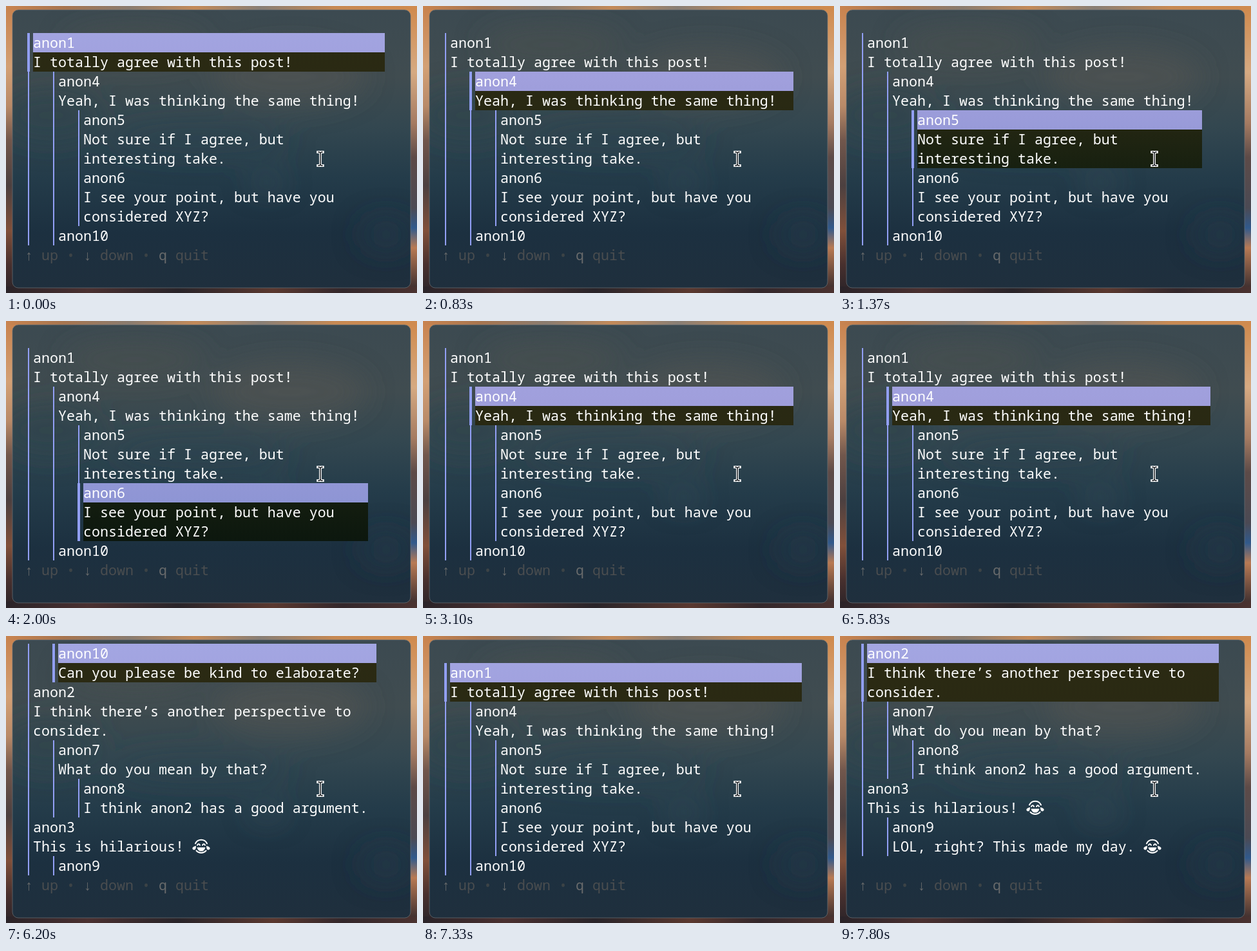
Animation, 638 px wide and 446 px high, one loop 8000 ms. Source, as an HTML page:

```html
<!DOCTYPE html>
<html lang="en">
<head>
<meta charset="utf-8">
<title>Comment thread</title>
<style>
  html, body { margin: 0; width: 100%; height: 100%; overflow: hidden; background: #2a2328; }
  svg { display: block; width: 100%; height: 100%; }
  text { font: 21.67px "Noto Sans Mono", "DejaVu Sans Mono", monospace; fill: #fff; white-space: pre; }
  .key { fill: #686a6b; }
  .hint { fill: #4a4d4f; }
  .dot { fill: #3c4346; }
  .bar { fill: #929ff5; }
  .face { fill: none; stroke: #fff; stroke-width: 2; stroke-linecap: round; stroke-linejoin: round; }
  .solid { fill: #fff; stroke: none; }
</style>
</head>
<body>
<svg viewBox="0 0 638 446" preserveAspectRatio="none">
  <defs>
    <linearGradient id="sky">
      <stop offset="0" stop-color="#c98450"/><stop offset=".14" stop-color="#a8754f"/>
      <stop offset=".3" stop-color="#8a7c70"/><stop offset=".46" stop-color="#c48a59"/>
      <stop offset=".62" stop-color="#897f76"/><stop offset=".8" stop-color="#c78953"/>
      <stop offset="1" stop-color="#d08b4f"/>
    </linearGradient>
    <linearGradient id="west" x2="0" y2="1">
      <stop offset="0" stop-color="#c98450"/><stop offset=".2" stop-color="#d3a075"/>
      <stop offset=".34" stop-color="#b98a68"/><stop offset=".46" stop-color="#72574c"/>
      <stop offset=".62" stop-color="#4c4040"/><stop offset=".78" stop-color="#81503a"/>
      <stop offset=".9" stop-color="#48302e"/><stop offset="1" stop-color="#2a2328"/>
    </linearGradient>
    <linearGradient id="east" x2="0" y2="1">
      <stop offset="0" stop-color="#d08b4f"/><stop offset=".22" stop-color="#d6aa82"/>
      <stop offset=".4" stop-color="#a57b62"/><stop offset=".52" stop-color="#5d4b48"/>
      <stop offset=".7" stop-color="#4b4a54"/><stop offset=".77" stop-color="#315a8c"/>
      <stop offset=".84" stop-color="#b87a54"/><stop offset="1" stop-color="#30262b"/>
    </linearGradient>
    <linearGradient id="ground">
      <stop offset="0" stop-color="#2a2328"/><stop offset=".2" stop-color="#4a3030"/>
      <stop offset=".42" stop-color="#292429"/><stop offset=".65" stop-color="#5a382f"/>
      <stop offset=".82" stop-color="#33272b"/><stop offset="1" stop-color="#4a3230"/>
    </linearGradient>
    <linearGradient id="glass" x2="0" y2="1">
      <stop offset="0" stop-color="#3c4a51"/><stop offset=".24" stop-color="#404c50"/>
      <stop offset=".42" stop-color="#334750"/><stop offset=".6" stop-color="#243c4a"/>
      <stop offset=".8" stop-color="#1c3040"/><stop offset="1" stop-color="#1f2f3d"/>
    </linearGradient>
    <linearGradient id="head" gradientUnits="userSpaceOnUse" x1="0" y1="12" x2="0" y2="282">
      <stop offset="0" stop-color="#a3a6e2"/><stop offset=".4" stop-color="#a09fdc"/>
      <stop offset="1" stop-color="#8e95d4"/>
    </linearGradient>
    <linearGradient id="body" gradientUnits="userSpaceOnUse" x1="0" y1="42" x2="0" y2="342">
      <stop offset="0" stop-color="#2b2a13"/><stop offset=".38" stop-color="#292913"/>
      <stop offset=".7" stop-color="#172010"/><stop offset="1" stop-color="#0c170e"/>
    </linearGradient>
    <filter id="soft" x="-50%" y="-50%" width="200%" height="200%"><feGaussianBlur stdDeviation="22"/></filter>
    <clipPath id="pane"><rect x="10" y="6" width="618" height="432" rx="9"/></clipPath>
  </defs>

  <rect width="638" height="446" fill="url(#sky)"/>
  <rect y="6" width="20" height="440" fill="url(#west)"/>
  <rect x="618" y="6" width="20" height="440" fill="url(#east)"/>
  <rect y="436" width="638" height="10" fill="url(#ground)"/>
  <g clip-path="url(#pane)">
    <rect x="10" y="6" width="618" height="432" fill="url(#glass)"/>
    <g filter="url(#soft)">
      <ellipse cx="440" cy="110" rx="120" ry="45" fill="#575953" opacity=".5"/>
      <ellipse cx="200" cy="60" rx="110" ry="30" fill="#4e5350" opacity=".45"/>
      <ellipse cx="70" cy="170" rx="80" ry="40" fill="#2c414c" opacity=".5"/>
      <ellipse cx="300" cy="205" rx="140" ry="25" fill="#2b4250" opacity=".5"/>
      <ellipse cx="405" cy="275" rx="30" ry="10" fill="#4d616a" opacity=".5"/>
      <ellipse cx="590" cy="355" rx="40" ry="25" fill="#2b3d4c" opacity=".6"/>
    </g>
  </g>
  <rect x="10" y="6" width="618" height="432" rx="9" fill="none" stroke="#6b7478" stroke-opacity=".7"/>
  <g id="thread"></g>
  <text x="29" y="395"><tspan class="key">↑</tspan><tspan class="hint" x="55">up</tspan><tspan class="dot" x="94">•</tspan><tspan class="key" x="120">↓</tspan><tspan class="hint" x="146">down</tspan><tspan class="dot" x="211">•</tspan><tspan class="key" x="237">q</tspan><tspan class="hint" x="263">quit</tspan></text>
  <g fill="none" stroke-linecap="square">
    <path id="beam" d="M484.500 227H486.500L488 228.500L489.500 227H491.500M488 228.500V246.500M484.500 248H486.500L488 246.500L489.500 248H491.500" stroke="#fff" stroke-width="4"/>
    <use href="#beam"/>
    <path d="M485 227H486.500L488 228.500L489.500 227H491M488 228.500V246.500M485 248H486.500L488 246.500L489.500 248H491" stroke="#15181c" stroke-width="1.500"/>
  </g>
</svg>
<script>
const CELL = 13, ROW = 30, TOP = 12, VISIBLE = 12, LOOP = 8000;

// depth, author, text lines
const comments = [
  [0, "anon1", "I totally agree with this post!"],
  [1, "anon4", "Yeah, I was thinking the same thing!"],
  [2, "anon5", "Not sure if I agree, but", "interesting take."],
  [2, "anon6", "I see your point, but have you", "considered XYZ?"],
  [1, "anon10", "Can you please be kind to elaborate?"],
  [0, "anon2", "I think there’s another perspective to", "consider."],
  [1, "anon7", "What do you mean by that?"],
  [2, "anon8", "I think anon2 has a good argument."],
  [0, "anon3", "This is hilarious! 😂"],
  [1, "anon9", "LOL, right? This made my day. 😂"]
];

// start time, selected author, rows scrolled away
const steps = [
  [0, "anon1", 0], [830, "anon4", 0], [1370, "anon5", 0], [2000, "anon6", 0],
  [3100, "anon4", 0], [3900, "anon1", 0], [5830, "anon4", 0],
  [6200, "anon10", 11], [7330, "anon1", 0], [7800, "anon2", 13]
];

// The first row of the list is blank.
const rows = [null, ...comments.flatMap(([depth, author, ...lines]) =>
  [author, ...lines].map((text, i) => ({ depth, author, text, head: i === 0 })))];

const rect = (x, y, w, h, attrs) => `<rect x="${x}" y="${y}" width="${w}" height="${h}" ${attrs}/>`;

const laughing = (x, y) => `<g class="face" transform="translate(${x} ${y})">
  <path d="M-9 -4.500A10 10 0 0 1 9 -4.500M-7.500 6.600A10 10 0 0 0 7.500 6.600"/>
  <path d="M-6 -2Q-4 -5.500 -2 -2M2 -2Q4 -5.500 6 -2"/>
  <path class="solid" d="M-6.500 1.500H6.500Q5 7.500 0 7.500T-6.500 1.500Z"/>
  <path class="solid" d="M-8 -1Q-8 5 -11 5.500Q-14 5 -13.500 2Q-12 0 -8 -1ZM8 -1Q8 5 11 5.500Q14 5 13.500 2Q12 0 8 -1Z"/>
</g>`;

function drawRow(row, y, selected) {
  if (!row) return "";
  const { depth, text, head } = row;
  const left = 42 + depth * 3 * CELL;
  const active = row.author === selected;
  let out = "";
  if (active) out += rect(left, y, 588 - depth * CELL - left, ROW, `fill="url(#${head ? "head" : "body"})"`);
  for (let d = 0; d <= depth; d++) {
    const wide = active && d === depth;
    out += rect((wide ? 33 : 34) + d * 3 * CELL, y, wide ? 4 : 2, ROW, 'class="bar"');
  }
  const plain = text.replace("😂", "");
  out += `<text x="${left}" y="${y + 23}">${plain}</text>`;
  if (plain !== text) out += laughing(left + plain.length * CELL + 14, y + 15);
  return out;
}

const thread = document.getElementById("thread");
let shown = null;

function render(time) {
  const step = steps.findLast(([start]) => start <= time);
  if (step === shown) return;
  shown = step;
  const [, selected, scroll] = step;
  thread.innerHTML = rows.slice(scroll, scroll + VISIBLE)
    .map((row, i) => drawRow(row, TOP + i * ROW, selected)).join("");
}

const origin = performance.now();
function tick() {
  render((performance.now() - origin) % LOOP);
  requestAnimationFrame(tick);
}
tick();
</script>
</body>
</html>
```
